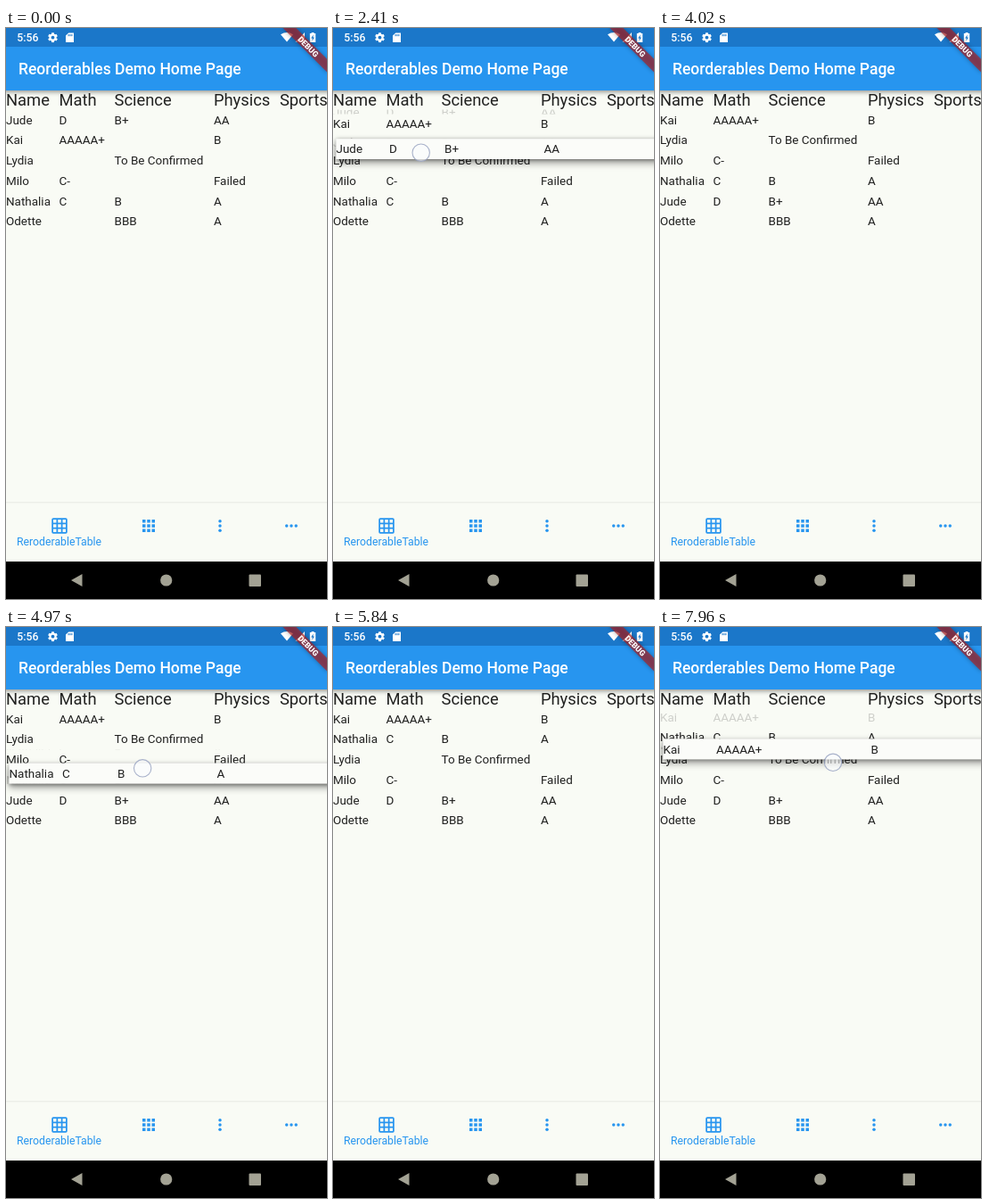
An HTML page with a canvas that plays this animation: 360 by 640 pixels, repeating every 8 s.

```html
<!DOCTYPE html>
<html lang="en">
<head>
<meta charset="utf-8">
<title>Reorderables Demo Home Page</title>
<style>
html, body { margin: 0; width: 100%; height: 100%; overflow: hidden; background: #f9fbf5; }
canvas { display: block; width: 360px; height: 640px; }
</style>
</head>
<body>
<canvas id="stage"></canvas>
<script>
const W = 360, H = 640, LOOP = 8000;
const canvas = document.getElementById('stage');
const ctx = canvas.getContext('2d');
const dpr = window.devicePixelRatio || 1;
canvas.width = W * dpr;
canvas.height = H * dpr;

const FONT = 'Roboto, "Noto Sans", sans-serif';
const PAPER = '#f9fbf5', BLUE = '#2795ef', INK = 'rgba(0,0,0,0.87)';
const COLS = [0, 59.4, 121.5, 232.9, 306.9];
const HEAD = ['Name', 'Math', 'Science', 'Physics', 'Sports'];
const ROWS = [
  ['Jude', 'D', 'B+', 'AA'],
  ['Kai', 'AAAAA+', '', 'B'],
  ['Lydia', '', 'To Be Confirmed', ''],
  ['Milo', 'C-', '', 'Failed'],
  ['Nathalia', 'C', 'B', 'A'],
  ['Odette', '', 'BBB', 'A']
];
const TOP = 91.5, ROW_H = 22.79, LIFT = 3.5, LAG = 40, SHIFT_MS = 180;

// path: [time, x, y] of the finger; shifts: [time, from slot, to slot]
const DRAGS = [
  { row: 0, down: 1080, lift: 1450, release: 2860,
    path: [[2180, 88, 102], [2260, 90, 109], [2400, 98, 137], [2540, 107, 171],
           [2640, 112, 190], [2700, 112.5, 191.5], [2860, 114, 192]],
    shifts: [[2270, 0, 1], [2455, 1, 3], [2665, 3, 4]] },
  { row: 4, down: 4560, lift: 4850, release: 5590,
    path: [[4850, 150.5, 175], [4920, 152, 166], [5140, 157, 133],
           [5180, 158, 129], [5220, 158.5, 125.5], [5380, 160, 121]],
    shifts: [[4970, 3, 2], [5215, 2, 1]] },
  { row: 1, down: 7460, lift: 7840, release: LOOP,
    path: [[7840, 188.5, 101.5], [7880, 189.5, 112], [7920, 192, 131.5], [7960, 194, 151.5], [8000, 195, 166]],
    shifts: [[7940, 0, 1]] }
];

let order = [0, 1, 2, 3, 4, 5];
for (const d of DRAGS) {
  d.before = order;
  d.others = order.filter(r => r !== d.row);
  order = d.others.slice();
  order.splice(d.shifts[d.shifts.length - 1][2], 0, d.row);
  d.after = order;
}

function fingerAt(path, t) {
  if (t <= path[0][0]) return path[0].slice(1);
  for (let i = 1; i < path.length; i++) {
    const [t0, x0, y0] = path[i - 1], [t1, x1, y1] = path[i];
    if (t < t1) {
      const k = (t - t0) / (t1 - t0);
      return [x0 + (x1 - x0) * k, y0 + (y1 - y0) * k];
    }
  }
  return path[path.length - 1].slice(1);
}

function text(str, x, y, size, color, weight = 400) {
  ctx.font = `${weight} ${size}px ${FONT}`;
  ctx.fillStyle = color;
  ctx.fillText(str, x, y);
}

function box(x, y, w, h, color) {
  ctx.fillStyle = color;
  ctx.fillRect(x, y, w, h);
}

function dot(x, y, r, color) {
  ctx.fillStyle = color;
  ctx.beginPath();
  ctx.arc(x, y, r, 0, Math.PI * 2);
  ctx.fill();
}

function poly(color, ...pts) {
  ctx.fillStyle = color;
  ctx.beginPath();
  for (let i = 0; i < pts.length; i += 2) ctx.lineTo(pts[i], pts[i + 1]);
  ctx.fill();
}

function shadow(color, blur, y) {
  ctx.shadowColor = color;
  ctx.shadowBlur = blur * dpr;
  ctx.shadowOffsetY = y * dpr;
}

function cells(row, x, top) {
  ROWS[row].forEach((s, i) => text(s, COLS[i] + x, top + 16, 13.475, INK));
}

function ghost(row, top, h) {
  if (h <= 0) return;
  ctx.save();
  ctx.beginPath();
  ctx.rect(0, top, W, h);
  ctx.clip();
  ctx.globalAlpha = 0.2;
  cells(row, 0, top + (h - ROW_H) / 2);
  ctx.restore();
}

function drawList(list) {
  list.forEach((row, i) => cells(row, 0, TOP + i * ROW_H));
}

// The old space closes while the new one opens.
function drawShifting(d, t) {
  let from = d.before.indexOf(d.row), to = from, p = 0;
  for (const [start, a, b] of d.shifts) {
    if (t < start) break;
    p = Math.min(1, (t - start) / SHIFT_MS);
    from = a;
    to = b;
  }
  let y = TOP;
  const space = h => { ghost(d.row, y, h); y += h; };
  for (let i = 0; i <= d.others.length; i++) {
    if (i === from) space(ROW_H * (1 - p));
    if (i === to && to !== from) space(ROW_H * p);
    if (i < d.others.length) {
      cells(d.others[i], 0, y);
      y += ROW_H;
    }
  }
}

function drawLifted(d, t) {
  const dy = fingerAt(d.path, t - LAG)[1] - d.path[0][2];
  const y = TOP + d.before.indexOf(d.row) * ROW_H + LIFT + dy;
  ctx.save();
  shadow('rgba(0,0,0,0.4)', 9, 4);
  box(LIFT, y, 500, ROW_H, '#fbfcf9');
  shadow('rgba(0,0,0,0.35)', 4, 1);
  box(LIFT, y, 500, ROW_H, '#fbfcf9');
  ctx.restore();
  cells(d.row, LIFT, y);
}

function drawTouch([x, y]) {
  dot(x, y, 10, 'rgba(250,251,253,0.6)');
  ctx.strokeStyle = 'rgba(140,152,185,0.75)';
  ctx.lineWidth = 1.1;
  ctx.beginPath();
  ctx.arc(x, y, 9.7, 0, Math.PI * 2);
  ctx.stroke();
}

function drawStatusIcons() {
  const white = '#fff', bar = '#1b77c9';
  text('5:56', 12.3, 15, 12.25, white, 500);
  for (let i = 0; i < 6; i++) {
    ctx.save();
    ctx.translate(52.5, 10.7);
    ctx.rotate(i * Math.PI / 3);
    box(-1.4, -5.4, 2.8, 3, white);
    ctx.restore();
  }
  dot(52.5, 10.7, 4.1, white);
  dot(52.5, 10.7, 1.9, bar);
  poly(white, 70.2, 5.5, 76, 5.5, 76, 16, 67, 16, 67, 8.6);
  for (let i = 0; i < 3; i++) box(69.6 + i * 1.9, 7, 1, 2.2, bar);
  ctx.fillStyle = white;
  ctx.beginPath();
  ctx.moveTo(315, 15.6);
  ctx.lineTo(308, 7.2);
  ctx.quadraticCurveTo(315, 2.8, 322, 7.2);
  ctx.fill();
  poly(white, 335, 5, 335, 15.5, 324.5, 15.5);
  box(342.6, 5, 2.8, 1.5, white);
  box(340.8, 6, 6.4, 10, white);
  poly(bar, 344.6, 7.4, 342.1, 11.6, 343.7, 11.6, 343.4, 14.6, 345.9, 10.4, 344.4, 10.4);
}

function drawBanner() {
  ctx.save();
  ctx.translate(W, 0);
  ctx.rotate(Math.PI / 4);
  ctx.save();
  shadow('rgba(0,0,0,0.5)', 5, 0);
  box(-35, 24.5, 70, 10.5, 'rgba(183,28,28,0.63)');
  ctx.restore();
  ctx.textAlign = 'center';
  text('DEBUG', 0, 32.9, 8.9, '#fff', 900);
  ctx.restore();
}

function drawAppBar() {
  ctx.save();
  shadow('rgba(0,0,0,0.4)', 5, 2);
  box(-10, 0, W + 20, 70, BLUE);
  ctx.restore();
  box(0, 0, W, 21, '#1b77c9');
  drawStatusIcons();
  text('Reorderables Demo Home Page', 14, 52, 17.5, '#fff', 500);
  drawBanner();
}

function drawBottom() {
  box(0, 531, W, 1.5, 'rgba(0,0,0,0.05)');
  ctx.fillStyle = BLUE;
  ctx.beginPath();
  ctx.roundRect(51.25, 549.25, 17.5, 17.5, 1.75);
  ctx.fill();
  for (let i = 0; i < 9; i++) {
    const x = (i % 3) * 5.25, y = Math.floor(i / 3) * 5.25;
    box(53 + x, 551 + y, 3.5, 3.5, PAPER);
    box(153 + x, 551 + y, 3.5, 3.5, BLUE);
  }
  for (const k of [-5.25, 0, 5.25]) {
    dot(240, 558 + k, 1.75, BLUE);
    dot(320 + k, 558, 1.75, BLUE);
  }
  text('ReroderableTable', 12, 579.6, 12.25, BLUE);

  const gray = '#a3a294';
  box(0, 598, W, 42, '#000');
  poly(gray, 73, 619, 85.5, 612, 85.5, 626);
  dot(179.7, 619, 6.6, gray);
  ctx.fillStyle = gray;
  ctx.beginPath();
  ctx.roundRect(272.5, 612.5, 13.5, 13.5, 1);
  ctx.fill();
}

function draw(t) {
  ctx.setTransform(dpr, 0, 0, dpr, 0, 0);
  box(0, 0, W, H, PAPER);
  HEAD.forEach((s, i) => text(s, COLS[i], 87, 18.375, INK));

  const d = DRAGS.find(d => t < d.release);
  const lifted = t >= d.lift;
  if (lifted) drawShifting(d, t);
  else drawList(d.before);
  drawAppBar();
  drawBottom();
  if (lifted) drawLifted(d, t);
  if (t >= d.down) drawTouch(fingerAt(d.path, t));
}

const began = performance.now();
function tick() {
  draw((performance.now() - began) % LOOP);
  requestAnimationFrame(tick);
}
tick();
</script>
</body>
</html>
```
